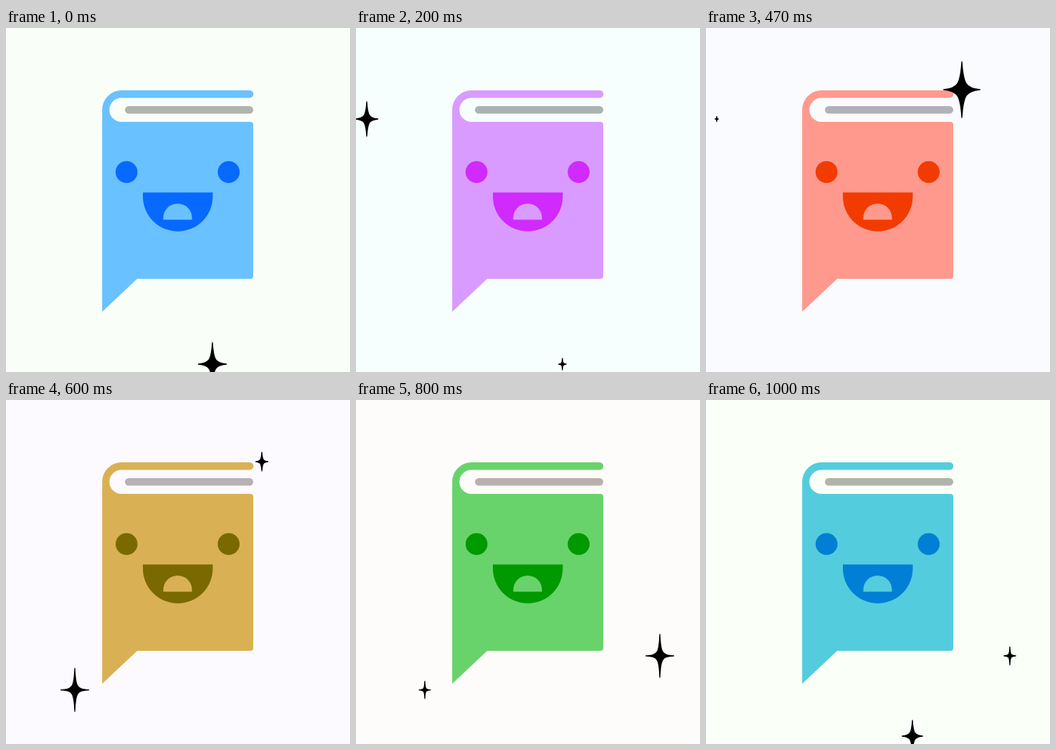
Recreate the animation shown at these times as an HTML page. Size 480 by 480 pixels, loop 1070 ms.

```html
<!DOCTYPE html>
<html lang="en">
<head>
<meta charset="utf-8">
<title>Smiling book</title>
<style>
  html, body { margin: 0; width: 100%; height: 100%; overflow: hidden; background: var(--paper); }
  svg { display: block; width: 100vw; height: 100vh; }
  .book { filter: blur(0.6px); }
  .cover { fill: var(--cover); }
  .face { fill: var(--face); }
  .pages { fill: var(--pages); }
</style>
</head>
<body>
<svg viewBox="0 0 480 480">
  <g class="book">
    <path class="cover" d="M134.200 396V114A27 27 0 0 1 161.200 87H340A5 5 0 0 1 340 97.500H161A16.700 16.700 0 0 0 161 131H341A4 4 0 0 1 345 135V346A4 4 0 0 1 341 350H183Z"/>
    <rect class="pages" x="166" y="109" width="179" height="10.500" rx="5.200"/>
    <g class="face">
      <circle cx="168.200" cy="201" r="15.300"/>
      <circle cx="310.700" cy="201" r="15.300"/>
      <path d="M191 229.500H288.500V235A48.700 48.700 0 0 1 191 235Z"/>
    </g>
    <path class="cover" d="M219.500 267.500V265A20 20 0 0 1 259.500 265V267.500Z"/>
  </g>
  <g id="stars" stroke="#000" stroke-width="1.300" stroke-linejoin="round"></g>
</svg>
<script>
const LOOP = 1070, STEPS = 16;

// Each channel is a cosine around the hue circle: [mean, amplitude, phase in degrees].
const palette = {
  cover: [[178, 103, 135], [179, 35, 295], [181, 105, 45]],
  face: [[98, 181, 120], [93, 61, 281], [98.5, 192, 31]],
  paper: [[250, 4, 250], [253, 3, 20], [252, 4.5, 150]],
  pages: [[178, 8, 250], [178, 2, 20], [177, 7, 140]]
};

// Half heights per step, counted from the star's first step; a lower pinch gives thinner arms.
const stars = [
  { x: 288, y: 469, pinch: 0.9, start: 13, sizes: [4, 12, 22, 30, 33, 22, 8] },
  { x: 15, y: 127, pinch: 0.9, start: 1, sizes: [3, 10, 24, 36, 32, 16, 3.5] },
  { x: 357, y: 86, pinch: 0.95, start: 4, sizes: [3, 10, 25, 39, 29, 13] },
  { x: 96, y: 404.5, pinch: 0.62, start: 8, sizes: [12, 30, 46, 30, 12] },
  { x: 424, y: 357, pinch: 0.62, start: 10, sizes: [4, 12, 30, 46, 30, 12.5] }
];

const group = document.getElementById("stars");
for (const star of stars) {
  star.node = document.createElementNS("http://www.w3.org/2000/svg", "path");
  group.append(star.node);
}

function starPath({ x, y, pinch }, h) {
  const w = h * 0.65;
  const p = (dx, dy) => `${(x + dx * h).toFixed(2)} ${(y + dy * h).toFixed(2)}`;
  const arc = (sx, sy, toSide) => {
    const nearTip = p(0.06 * pinch * sx, 0.2 * pinch * sy);
    const nearSide = p(0.15 * pinch * sx, 0.06 * pinch * sy);
    return toSide
      ? `C${nearTip} ${nearSide} ${p(0.65 * sx, 0)}`
      : `C${nearSide} ${nearTip} ${p(0, sy)}`;
  };
  const body = `M${p(0, -1)}${arc(1, -1, true)}${arc(1, 1, false)}${arc(-1, 1, true)}${arc(-1, -1, false)}Z`;
  return `${body}M${x - w} ${y}H${x + w}M${x} ${y - h}V${y + h}`;
}

function color(channels, angle) {
  const values = channels.map(([mean, amp, phase]) => {
    const v = mean + amp * Math.cos((angle - phase) * Math.PI / 180);
    return Math.round(Math.min(255, Math.max(0, v)));
  });
  return `rgb(${values.join(",")})`;
}

function draw(step) {
  const angle = step * 360 / STEPS;
  for (const name in palette) {
    document.documentElement.style.setProperty("--" + name, color(palette[name], angle));
  }
  for (const star of stars) {
    const h = star.sizes[(step - star.start + STEPS) % STEPS];
    star.node.setAttribute("d", h ? starPath(star, h) : "");
  }
}

// Fifteen steps a second, on a 10 ms grid.
function stepAt(ms) {
  const tick = Math.floor(ms % LOOP / 10) * 10;
  return Math.floor((tick + 4) * 0.015);
}

let shown = -1;
function frame() {
  const step = stepAt(performance.now());
  if (step !== shown) draw(shown = step);
  requestAnimationFrame(frame);
}
frame();
</script>
</body>
</html>
```
